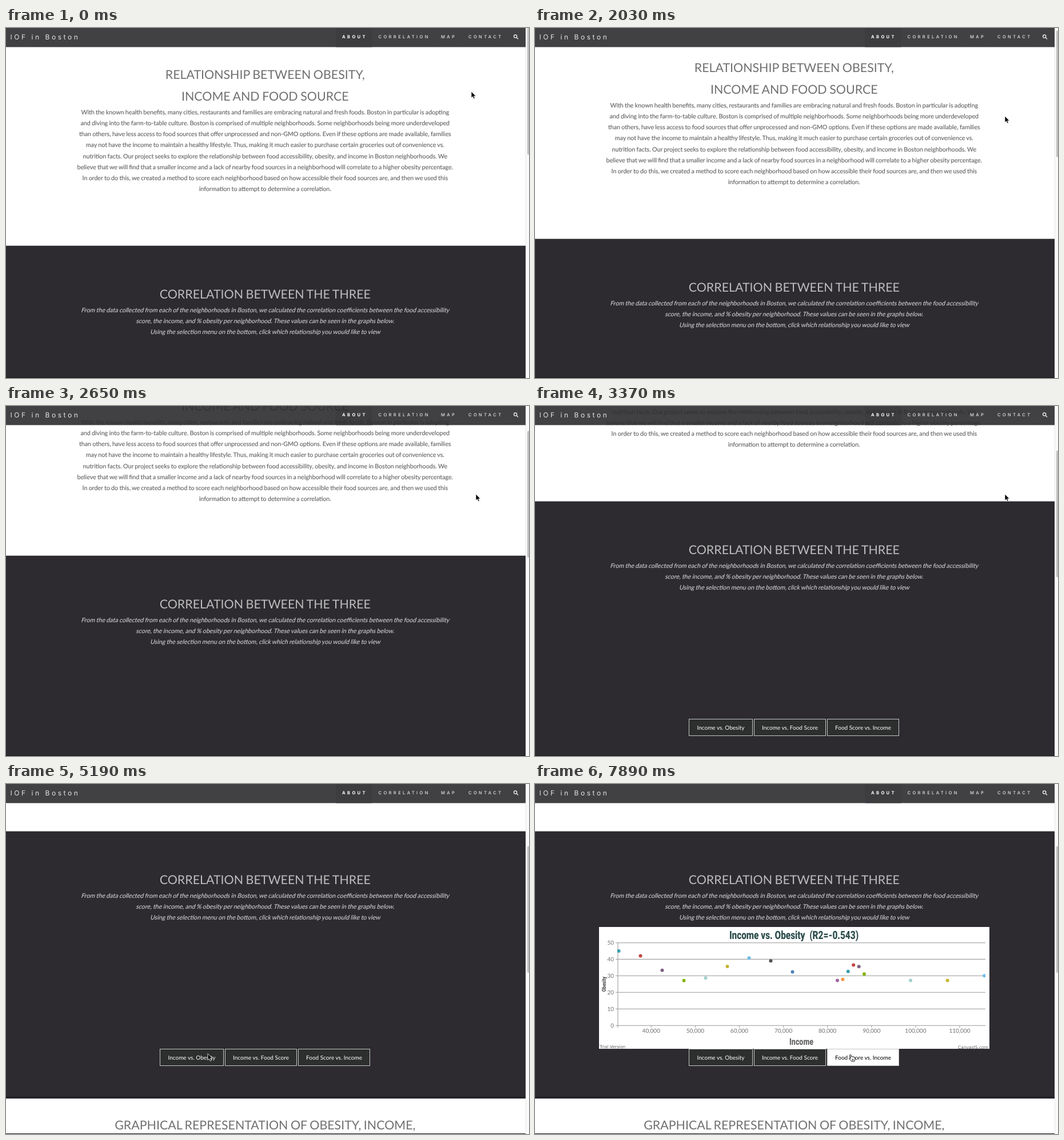
Write an HTML page that moves like this. It is 915 px wide and 612 px high and loops after 8000 ms.

```html
<!DOCTYPE html>
<html lang="en">
<head>
<meta charset="utf-8">
<title>IOF in Boston</title>
<style>
  html, body { margin: 0; width: 100%; height: 100%; overflow: hidden; background: #fff; }
  svg { display: block; width: 915px; height: 612px; font-family: Lato, sans-serif; }
  text { white-space: pre; text-rendering: geometricPrecision; }
  .mid { text-anchor: middle; }
  .end { text-anchor: end; }
  .head, .body { word-spacing: -.042em; }
  .head { font-size: 21.4px; fill: #707070; }
  .body { font-size: 10.7px; fill: #646464; stroke: #646464; stroke-width: .15px; }
  .dark { fill: #bdbdbd; }
  .lean { fill: #c8c8c8; stroke: #c8c8c8; }
  .nav { font: 500 7.6px Inter, sans-serif; letter-spacing: 3.35px; fill: #e2e2e2; }
  .on { font-weight: 700; fill: #fff; }
  .brand { font: 400 12px Inter, sans-serif; letter-spacing: 3.55px; fill: #e2e2e2; }
  .btn rect { fill: #2c2f2e; stroke: #c3c6c3; }
  .btn text { font-size: 10px; fill: #fff; }
  .btn.hover rect { fill: #fff; }
  .btn.hover text { fill: #000; }
  .tick { font-size: 10px; fill: #707070; }
  .note { font: 7.5px "DejaVu Sans", sans-serif; fill: #606060; }
  .black { font-family: Roboto, sans-serif; font-weight: 900; }
</style>
</head>
<body>
<svg viewBox="0 0 915 612">
  <defs><clipPath id="plot"><rect x="144" y="270" width="644" height="153"/></clipPath></defs>
  <rect width="909" height="612" fill="#fff"/>
  <g id="page">
    <rect y="380.7" width="909" height="467.3" fill="#2d2b30"/>
    <rect y="844" width="909" height="4" fill="#242327"/>
    <g id="copy"></g>
    <g id="buttons"></g>
  </g>
  <g id="chart"></g>
  <g opacity=".9">
    <rect width="909" height="33.4" fill="#2d2d30"/>
    <rect x="577.5" width="63" height="33.4" fill="#29292c"/>
    <g id="nav"></g>
    <g fill="none" stroke="#e2e2e2" stroke-width="1.4">
      <circle cx="891.2" cy="14.6" r="2.6"/>
      <path d="M893.2 16.6L896 19.4"/>
    </g>
  </g>
  <rect x="909" width="6" height="612" fill="#fafafa"/>
  <rect x="909" width="1" height="612" fill="#e7e7e7"/>
  <rect id="thumb" x="912" width="5" height="221.5" rx="2" fill="#c1c1c1"/>
  <rect y="611" width="909" height="1" fill="#151517"/>
  <g id="cursor" stroke-linejoin="round">
    <path id="arrow" d="M0 0V11.2L2.6 8.9L4.3 12.8L6.3 12L4.6 8.2H8Z" fill="#000" stroke="#fff" stroke-width=".8"/>
    <path id="hand" fill="#fff" stroke="#000" stroke-width=".9"
      d="M0 1.2Q1-.6 2 1L3.4 4.6L4.6 4.2L5.6 4.7L6.7 4.4L7.6 5.2Q9.4 4.8 9.5 7Q9.4 10 8.4 12.4H3.4Q1.6 9.6-.8 8.2Q-1.6 6.6 .4 6.9L1.8 7.6Z M4.6 8.2V10.8M6.2 8.2V10.8"/>
  </g>
</svg>
<script>
const LOOP = 8000, CLICK = 6840, MID = 453.3;
const el = id => document.getElementById(id);
const text = (s, x, y, cls) => `<text x="${x}" y="${y}" class="${cls}">${s}</text>`;
const repeat = (n, draw) => Array.from({ length: n }, (_, i) => draw(i)).join("");
const lines = (list, y, gap, draw) => list.map((s, i) => draw(s, y + i * gap)).join("");
const centred = cls => (s, y) => text(s, MID, y, "mid " + cls);
// slanted regular face, as the page has no italic
const slanted = (s, y) =>
  `<text class="mid body lean" transform="translate(${MID} ${y}) skewX(-14)">${s}</text>`;
// one fixed narrow cut of the heavy face
const narrow = (s, x, y, size, fill, turn = 0) =>
  `<text class="mid black" font-size="${size}" fill="${fill}" transform="translate(${x} ${y}) rotate(${turn}) scale(.78 1)">${s}</text>`;

el("copy").innerHTML =
  lines(["RELATIONSHIP BETWEEN OBESITY,", "INCOME AND FOOD SOURCE"], 89, 37.6, centred("head")) +
  lines([
    "With the known health benefits, many cities, restaurants and families are embracing natural and fresh foods. Boston in particular is adopting",
    "and diving into the farm-to-table culture. Boston is comprised of multiple neighborhoods. Some neighborhoods being more underdeveloped",
    "than others, have less access to food sources that offer unprocessed and non-GMO options. Even if these options are made available, families",
    "may not have the income to maintain a healthy lifestyle. Thus, making it much easier to purchase certain groceries out of convenience vs.",
    "nutrition facts. Our project seeks to explore the relationship between food accessibility, obesity, and income in Boston neighborhoods. We",
    "believe that we will find that a smaller income and a lack of nearby food sources in a neighborhood will correlate to a higher obesity percentage.",
    "In order to do this, we created a method to score each neighborhood based on how accessible their food sources are, and then we used this",
    "information to attempt to determine a correlation."
  ], 150.8, 19.2, centred("body")) +
  text("CORRELATION BETWEEN THE THREE", MID, 472.6, "mid head dark") +
  lines([
    "From the data collected from each of the neighborhoods in Boston, we calculated the correlation coefficients between the food accessibility",
    "score, the income, and % obesity per neighborhood. These values can be seen in the graphs below.",
    "Using the selection menu on the bottom, click which relationship you would like to view"
  ], 496.5, 19.2, slanted) +
  text("GRAPHICAL REPRESENTATION OF OBESITY, INCOME,", MID, 901.5, "mid head");

function drawButtons() {
  let x = 269.5;
  el("buttons").innerHTML = ["Income vs. Obesity", "Income vs. Food Score", "Food Score vs. Income"].map((s, i) => {
    const w = i ? 125 : 111, left = x;
    x += w + 3;
    return `<g class="btn"><rect x="${left}" y="761.5" width="${w}" height="29"/>${text(s, left + w / 2, 779.7, "mid")}</g>`;
  }).join("");
}

el("nav").innerHTML = text("IOF in Boston", 7.5, 19.8, "brand") + text("ABOUT", 588, 18.2, "nav on") +
  text("CORRELATION", 651.5, 18.2, "nav") + text("MAP", 761, 18.2, "nav") + text("CONTACT", 809, 18.2, "nav");

const COLORS = ["#369ead", "#c24642", "#7f6084", "#86b402", "#a2d1cf", "#c8b631",
  "#6dbceb", "#52514e", "#4f81bc", "#a064a1", "#f79647"];

// a loose row, a tight cluster, then three outliers, on a flattening wave
function dot(i) {
  const x = i < 9 ? 146.5 + 38 * i : i < 15 ? 529 + 9.4 * (i - 9) : 657 + 64.6 * (i - 15);
  const y = 318 + i + (27 - i) * Math.cos(2 * Math.PI * (i - 3.3) / 6.1);
  return `<circle cx="${x}" cy="${y}" r="3" fill="${COLORS[i % COLORS.length]}"/>`;
}

function drawChart() {
  const rowY = i => 422.3 - i * 28.95, colX = i => 203.3 + i * 77.1;
  const grid = "M145 277.5V426" + repeat(6, i => `M141 ${rowY(i)}H788`) + repeat(8, i => `M${colX(i)} 422V426`);
  el("chart").innerHTML = `<rect x="112" y="250" width="683" height="213" fill="#fff"/>
    <path d="${grid}" fill="none" stroke="#adadad" stroke-width="1.3"/>
    ${repeat(6, i => text(i * 10, 138, rowY(i) + 3.6, "tick end"))}
    ${repeat(8, i => text(`${40 + i * 10},000`, colX(i), 434.6, "tick mid"))}
    ${narrow("Income vs. Obesity  (R2=-0.543)", 453, 270.6, 19.7, "#2f4f4f")}
    ${narrow("Income", 466, 455.6, 16, "#666")}
    ${narrow("Obesity", 124.4, 350, 9.9, "#555", -90)}
    ${text("Trial Version", 113, 461.7, "note")}${text("CanvasJS.com", 793, 462.8, "note end")}
    <g id="dots" clip-path="url(#plot)">${repeat(18, dot)}</g>`;
}

drawButtons();
drawChart();

// the screen is only refreshed at these moments
const REFRESH = [0, 170, 560, 2030, 2260, 2650, 3010, 3370, 3790, 4180, 4560, 4950, CLICK, 7080, 7380, 7650, 7890];
// key points: time, then values
const SCROLL = [[560, 0], [2030, 12], [2260, 34], [2650, 119], [3370, 214], [3790, 294], [4180, 298]];
const POINTER = [[0, 814, 111], [170, 821.5, 148], [560, 822, 154], [3790, 822, 154], [4180, 432, 430.5],
  [4560, 353, 470], [4950, 353, 471.5], [CLICK, 388.5, 468.5], [7380, 538, 474], [7650, 550.5, 472.5]];

// linear path through key points, held at both ends
function along(keys, t) {
  const next = keys.findIndex(k => k[0] > t);
  if (next < 1) return keys.at(next).slice(1);
  const a = keys[next - 1], b = keys[next], p = (t - a[0]) / (b[0] - a[0]);
  return a.slice(1).map((v, i) => v + (b[i + 1] - v) * p);
}

const buttons = [...document.querySelectorAll(".btn")];
const show = (id, on) => el(id).setAttribute("visibility", on ? "visible" : "hidden");

function render(time) {
  const t = REFRESH.findLast(r => r <= time), clicked = t >= CLICK;
  const [scroll] = along(SCROLL, t), [x, y] = along(POINTER, t);
  const hover = clicked ? Math.floor((x - 262) / 127) : -1;
  const fade = Math.min(1, Math.max(0, (t - CLICK) / 1050)) ** 2;
  el("page").setAttribute("transform", `translate(0 ${-scroll})`);
  el("thumb").setAttribute("y", scroll * .365);
  el("cursor").setAttribute("transform", `translate(${x} ${y})`);
  el("dots").setAttribute("opacity", fade);
  buttons.forEach((b, i) => b.classList.toggle("hover", i === hover));
  show("chart", clicked);
  show("hand", clicked);
  show("arrow", !clicked);
}

const start = performance.now();
function tick() {
  render((performance.now() - start) % LOOP);
  requestAnimationFrame(tick);
}
tick();
</script>
</body>
</html>
```
